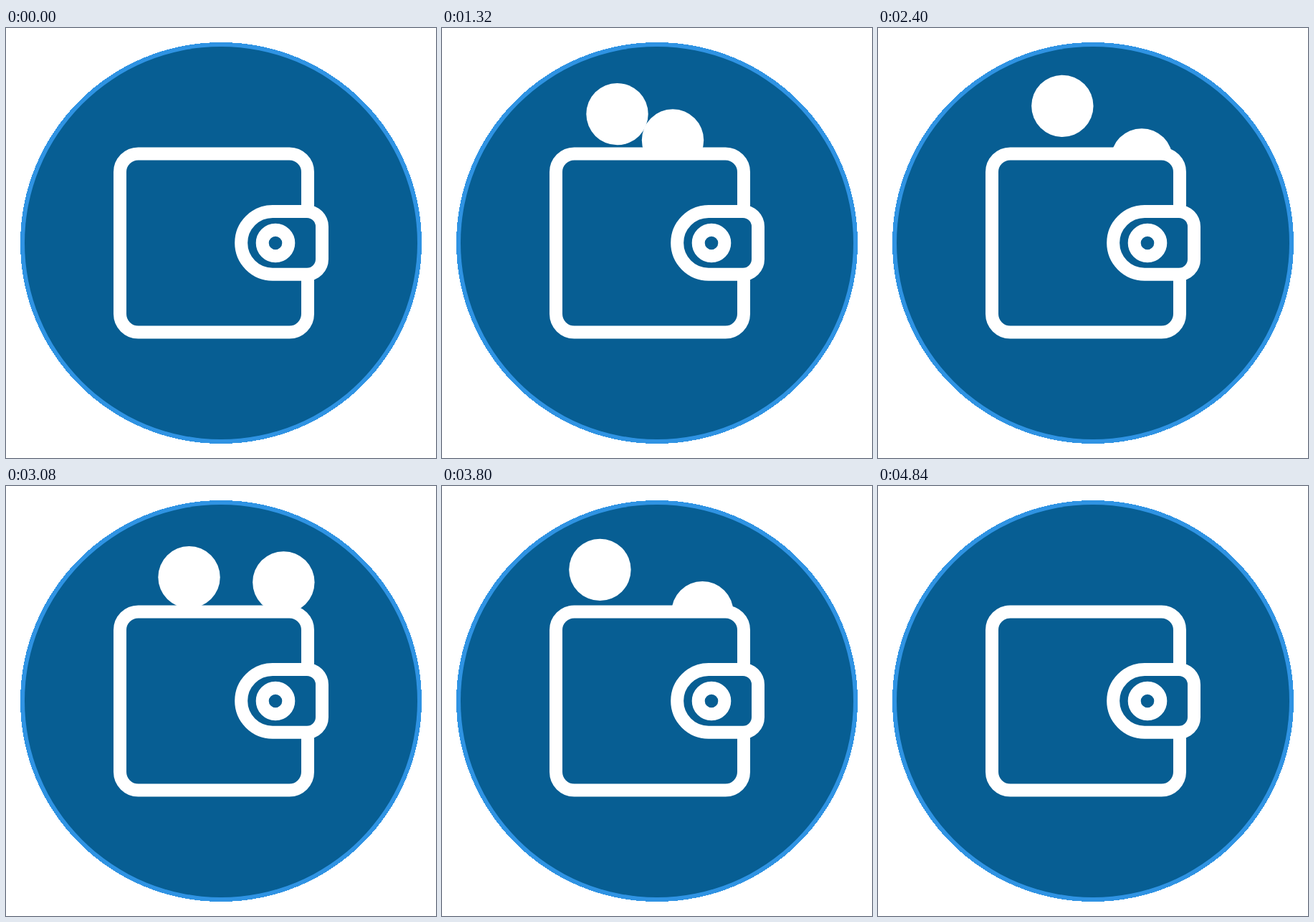
An HTML page for the animation above (5080 ms loop, 600x600 px).

```html
<!DOCTYPE html>
<html lang="en">
<head>
<meta charset="utf-8">
<title>Wallet</title>
<style>
  html, body { margin: 0; width: 100%; height: 100%; overflow: hidden; background: #fff; }
  svg { display: block; width: 100%; height: 100%; }
  .rim { fill: #2f93e3; shape-rendering: crispEdges; }
  .disc { fill: #075e93; }
  .line { fill: #075e93; stroke: #fff; stroke-width: 18; }
  .coin { fill: #fff; }
</style>
</head>
<body>
<svg viewBox="0 0 600 600">
  <circle class="rim" cx="300" cy="300" r="280"/>
  <circle class="disc" cx="300" cy="300" r="274"/>
  <circle class="coin" id="left" r="43.2"/>
  <circle class="coin" id="right" r="43.2"/>
  <rect class="line" x="159" y="175.5" width="262" height="249" rx="25.5"/>
  <path class="line" d="M372 256H420A21 21 0 0 1 441 277V322.7A21 21 0 0 1 420 343.7H372A43.85 43.85 0 0 1 372 256Z"/>
  <circle class="line" cx="376" cy="300" r="18.3"/>
</svg>
<script>
  const LOOP = 5080, STEP = 40, HIDDEN = 214, END = 4840;

  const sway = u => (1 - Math.cos(Math.PI * u)) / 2;
  const rise = u => 1 - (1 - u) ** 3;
  const sink = u => u * u;

  // Turning points [time, position]; each coin rises, sways and sinks
  const coins = {
    left: {
      x: [[440, 246.5], [1300, 244.5], [2900, 261], [3660, 219.5], [END, 246]],
      y: [[440, HIDDEN], [1415, 120], [1700, 121], [2140, 99], [2900, 136.5],
          [3460, 97], [3860, 118], [4260, 90], [END, HIDDEN]]
    },
    right: {
      x: [[1450, 322], [2400, 368], [2760, 393], [3880, 363], [4500, 328]],
      y: [[1000, HIDDEN], [1760, 142.7], [2420, 183.5], [2920, 130],
          [3740, 178], [4300, 115], [END, HIDDEN]]
    }
  };

  function at(keys, t, first = sway, last = sway) {
    const n = keys.length - 1;
    const next = keys.findIndex(key => key[0] > t);
    if (next === 0) return keys[0][1];
    if (next < 0) return keys[n][1];
    const [t0, a] = keys[next - 1], [t1, b] = keys[next];
    const ease = next === 1 ? first : next === n ? last : sway;
    return a + (b - a) * ease((t - t0) / (t1 - t0));
  }

  function draw(now) {
    const t = Math.floor(now % LOOP / STEP) * STEP;
    for (const [id, { x, y }] of Object.entries(coins)) {
      const coin = document.getElementById(id);
      coin.setAttribute('cx', at(x, t));
      coin.setAttribute('cy', at(y, t, rise, sink));
    }
  }

  const start = performance.now();
  (function tick() {
    draw(performance.now() - start);
    requestAnimationFrame(tick);
  })();
</script>
</body>
</html>
```
